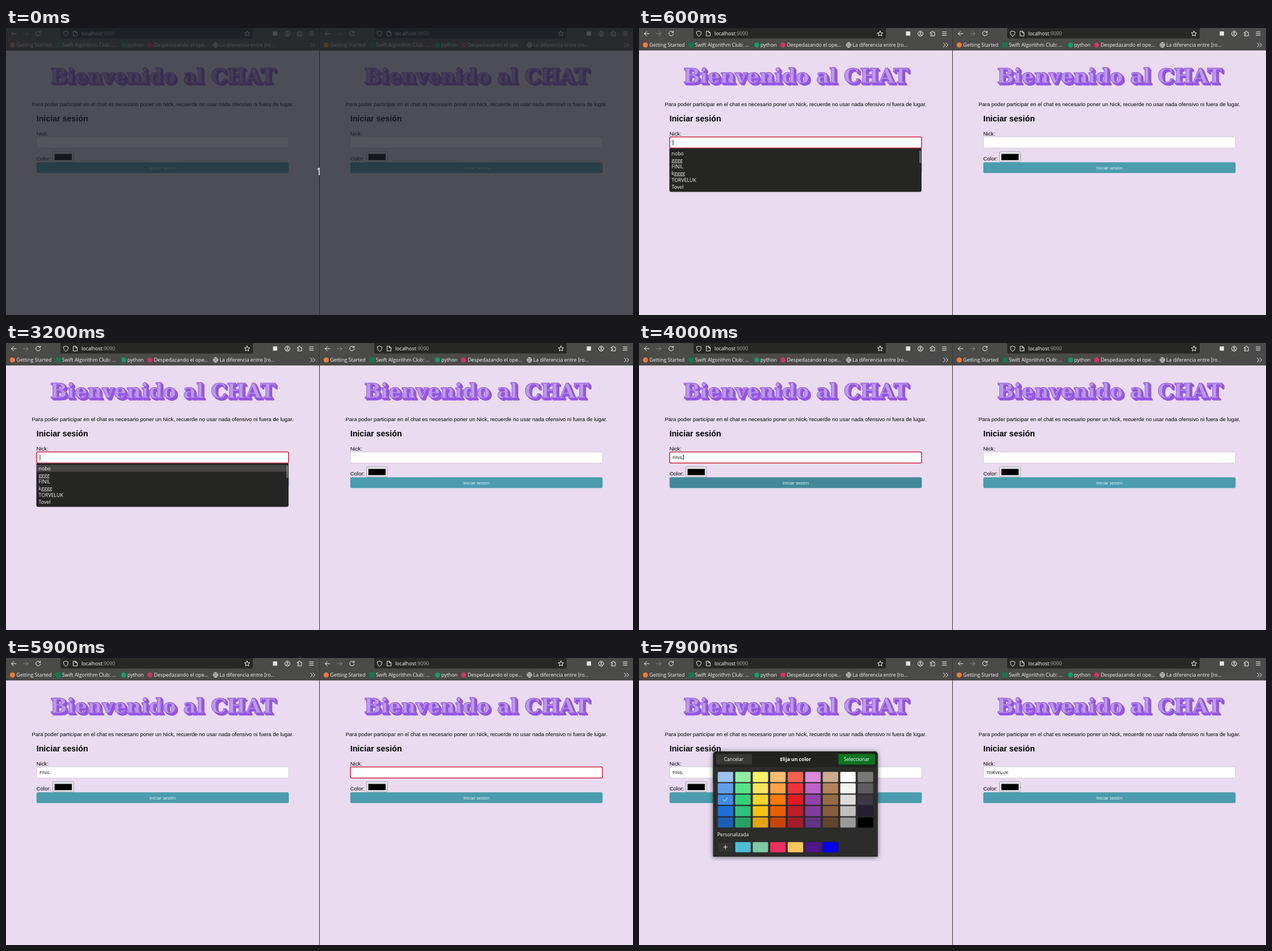
These frames come from a looping animation (1105 px wide and 507 px high, 8 s). An HTML page:

```html
<!DOCTYPE html>
<html lang="es">
<head>
<meta charset="utf-8">
<title>Chat</title>
<style>
  html, body { margin: 0; width: 100%; height: 100%; overflow: hidden; background: #eadbf0; }
  svg { display: block; width: 1105px; height: 507px; }
  text { font: 8.8px "Open Sans", "Noto Sans", sans-serif; white-space: pre; }
  .page { font: 9.48px "Liberation Sans", Arial, sans-serif; }
  .head { font: bold 14.22px "Liberation Sans", Arial, sans-serif; }
  .field { font-size: 7.9px; }
  .button { font-size: 7.6px; fill: #fff; }
  .dialog text { font-size: 8.5px; fill: #fff; }
  .dialog .strong { font-weight: bold; }
  .dialog { filter: drop-shadow(0 1px 4px rgba(0, 0, 0, .55)); }
  .title { font: bold 35.4px "DejaVu Serif", serif; }
  .mid { text-anchor: middle; }
  .icon { fill: none; stroke: #f2f2f0; stroke-width: 1; stroke-linecap: round; stroke-linejoin: round; }
</style>
</head>
<body>
<svg id="stage" viewBox="0 0 1105 507"></svg>
<script>
const LOOP = 8000, SHIFT = 553, ROW = 11.88;
const nicks = ["nobo", "gggg", "FINIL", "kgggg", "TORVELUK", "Tovel"];
const palette = [
  "99c1f1 62a0ea 3584e4 1c71d8 1a5fb4", "8ff0a4 57e389 33d17a 2ec27e 26a269",
  "f9f06b f8e45c f6d32d f5c211 e5a50a", "ffbe6f ffa348 ff7800 e66100 c64600",
  "f66151 ed333b e01b24 c01c28 a51d2d", "dc8add c061cb 9141ac 813d9c 613583",
  "cdab8f b5835a 986a44 865e3c 63452c", "ffffff f6f5f4 dedddb c0bfbc 9a9996",
  "777777 5e5e60 3d3846 241f31 000000"
].map(c => c.split(" "));
const custom = ["4bbfd8", "7bc8a4", "ee2e60", "ffc65d", "4f1787", "0000f0"];

const rect = (x, y, w, h, fill, r = 0, more = "") =>
  `<rect x="${x}" y="${y}" width="${w}" height="${h}" rx="${r}" fill="${fill}" ${more}/>`;
const text = (x, y, s, cls = "", fill = "#000") =>
  `<text x="${x}" y="${y}" class="${cls}" fill="${fill}">${s}</text>`;
const icon = (d, more = "") => `<path class="icon" d="${d}" ${more}/>`;
const dot = (x, fill) => `<circle cx="${x}" cy="30" r="4.5" fill="${fill}"/>`;
const group = (id, body, more = "") => `<g id="${id}" ${more}>${body}</g>`;

function browserBar() {
  const label = (x, s) => text(x, 33.2, s, "", "#f4f4f2");
  return rect(0, 0, 552, 39, "#4a4a48") + rect(0, 38.5, 552, 1, "#2e2e2d")
    + rect(96, -4, 339, 22.6, "#272725", 2.5)
    + icon("M18 10H9.5M13.5 6L9.5 10L13.5 14")
    + icon("M30.5 10H39M35 6L39 10L35 14", 'opacity=".35"')
    + icon("M60 7.2A4.1 4.1 0 1 0 60.8 10.5M60.7 5.5V8H58")
    + icon("M105.5 5.5L109.5 7C109.6 11 108.3 13.2 105.5 14.8C102.7 13.2 101.4 11 101.5 7Z")
    + icon("M119 5.7H123L125.5 8.2V14H119ZM122.8 5.9V8.4H125.3")
    + icon("M425 5.2L426.4 8.3L429.7 8.6L427.2 10.8L428 14.1L425 12.4L422 14.1L422.8 10.8L420.3 8.6L423.6 8.3Z")
    + rect(470.5, 6, 7.5, 7.5, "#e4e4e2")
    + icon("M500.5 10A4.5 4.5 0 1 1 491.5 10A4.5 4.5 0 1 1 500.5 10M497.4 8.6A1.4 1.4 0 1 1 494.6 8.6A1.4 1.4 0 1 1 497.4 8.6M493.4 12.6Q496 10.4 498.6 12.6")
    + icon("M514 7.5H516V6.7A1.3 1.3 0 0 1 518.6 6.7V7.5H521V14H514V11.8H515.2A1.2 1.2 0 0 0 515.2 9.4H514Z")
    + icon("M534.7 6.8H541.7M534.7 9.8H541.7M534.7 12.8H541.7")
    + icon("M536.5 26.5L540 30L536.5 33.5M541 26.5L544.5 30L541 33.5")
    + `<text x="133" y="13.2" fill="#fff">localhost<tspan fill="#a5a5a3">:9090</tspan></text>`
    + dot(11.3, "#f47a32") + label(18.3, "Getting Started")
    + rect(87.5, 25.5, 9, 9, "#147a49") + label(98.7, "Swift Algorithm Club: …")
    + dot(207.5, "#119b6c") + label(214, "python")
    + dot(253.5, "#cf3468") + label(260.7, "Despedazando el ope…")
    + icon("M373.7 30A4.2 4.2 0 1 1 365.3 30A4.2 4.2 0 1 1 373.7 30M365.5 30H373.5M369.5 25.8Q366 30 369.5 34.2Q373 30 369.5 25.8")
    + label(376.2, "La diferencia entre [ro…");
}

function title() {
  const layer = (d, fill) => `<text x="${276 + d}" y="${96.5 + d}" class="title mid" fill="${fill}" stroke="#9655e6" stroke-width=".9">Bienvenido al CHAT</text>`;
  let s = "";
  for (let i = 7; i > 0; i--) s += layer(i * .6, "#9655e6");
  return s + layer(0, "#bb9ce2");
}

const dropdown = id => group("list" + id,
  `<path d="M53.5 212.5H498V286a3.5 3.5 0 0 1-3.5 3.5H57a3.5 3.5 0 0 1-3.5-3.5Z" fill="#252524"/>`
  + rect(54, 215.5, 443.5, ROW, "#464645", 0, `id="row${id}"`)
  + nicks.map((n, i) => text(57.5, 224.7 + i * ROW, n, "", "#f5f5f3")).join("")
  + rect(494.5, 216.5, 2, 22, "#8d8d8b", 1, `id="bar${id}"`));

function pane(id) {
  return group("pane" + id,
    rect(0, 39, 552, 468, "#eadbf0") + browserBar() + title()
    + text(276, 138, "Para poder participar en el chat es necesario poner un Nick, recuerde no usar nada ofensivo ni fuera de lugar.", "page mid")
    + text(53.7, 165.3, "Iniciar sesión", "head")
    + text(53.7, 189.7, "Nick:", "page")
    + rect(54.1, 192.5, 444, 19.5, "#fff", 2, `id="input${id}"`)
    + text(59, 205, "", "field", "#000").replace("<text", `<text id="value${id}"`)
    + rect(59.5, 197.5, .9, 9.5, "#000", 0, `id="caret${id}"`)
    + text(53.7, 233.8, "Color:", "page")
    + rect(82.3, 218.6, 37, 18, "#e9e9ed", 2, `id="pick${id}" stroke="#8f8f9d" stroke-width=".8"`)
    + rect(85.5, 222.2, 30.6, 11.4, "#000", 0, 'stroke="#99999f" stroke-width=".6"')
    + rect(53.8, 237.2, 444.6, 19, "#4b9cae", 2.4, `id="send${id}"`)
    + text(276, 249.5, "Iniciar sesión", "button mid", "#fff")
    + dropdown(id), `transform="translate(${id * SHIFT})"`);
}

function colorDialog() {
  const W = 27.6, H = 18.4, PX = 30.85, PY = 20.1, X = 138.5, Y = 201;
  const cell = (c, x, y) => rect(x, y, W, H, "#" + c, 1.8, 'stroke="#222" stroke-width=".4"');
  const tick = (id, x, y) => icon(`M${x - 3.6} ${y + .2}L${x - 1.2} ${y + 2.7}L${x + 3.8} ${y - 2.6}`, `id="${id}"`);
  return group("dialog",
    rect(130.5, 165, 290.3, 60, "#222221", 5) + rect(130.5, 193, 290.3, 158, "#2c2c2b")
    + rect(135.3, 169.5, 64.3, 18.7, "#373736", 2.5, 'stroke="#1a1a19" stroke-width=".5"')
    + rect(351.2, 169.5, 65, 18.7, "#0c7420", 2.5, 'stroke="#084d15" stroke-width=".5"')
    + text(167, 182, "Cancelar", "mid") + text(275.8, 182, "Elija un color", "mid strong")
    + text(383.7, 182, "Seleccionar", "mid")
    + palette.map((col, i) => col.map((c, j) => cell(c, X + i * PX, Y + j * PY)).join("")).join("")
    + rect(X, Y + 2 * PY, W, H, "#fff", 1.8, 'id="glow" fill-opacity=".06"')
    + tick("tickBlue", 152.2, 250) + tick("tickBlack", 399, 290)
    + text(138, 315.3, "Personalizada")
    + rect(X, 325, W, 18.4, "#343433", 1.8, 'stroke="#1b1b1a" stroke-width=".6"')
    + icon("M149 334H155.4M152.2 330.8V337.2", 'stroke-width=".8"')
    + custom.map((c, i) => cell(c, X + (i + 1) * PX, 325)).join(""), 'class="dialog"');
}

document.getElementById("stage").innerHTML =
  rect(0, 0, 1105, 507, "#eadbf0") + pane(0) + pane(1) + rect(552, 0, 1, 507, "#383838")
  + group("tip", rect(361.8, 216.8, 94.4, 27, "#080808", 2.5, 'stroke="#3a3a39" stroke-width=".7"')
    + text(409, 233.7, "Rellene este campo.", "mid", "#fff"))
  + colorDialog()
  + group("dim", rect(0, 0, 1105, 507, "#1c2227", 0, 'fill-opacity=".76"')
    + `<text x="551.5" y="260" class="mid" fill="#fff" style="font-size:18.5px">1</text>`);

const el = id => document.getElementById(id);
const show = (id, v) => el(id).setAttribute("opacity", +v);
const fill = (id, c) => el(id).setAttribute("fill", c);

function setPane(id, s) {
  const input = el("input" + id), value = el("value" + id);
  input.setAttribute("stroke", s.focus ? "#c9243f" : "#c9c9cc");
  input.setAttribute("stroke-width", s.focus ? 1.5 : .8);
  value.textContent = s.value;
  show("caret" + id, s.caret);
  el("caret" + id).setAttribute("x", s.value ? 59.4 + value.getComputedTextLength() : 59.5);
  show("list" + id, s.list);
  show("bar" + id, s.bar);
  show("row" + id, s.row >= 0);
  el("row" + id).setAttribute("y", 215.5 + Math.max(0, s.row) * ROW);
  const mix = (a, b) => Math.round(a + (b - a) * s.hover);
  fill("send" + id, `rgb(${mix(75, 64)},${mix(156, 130)},${mix(174, 146)})`);
}

function draw(ms) {
  const t = Math.floor(ms / 100) * 100;
  const within = (a, b) => t >= a && t < b;
  const ramp = (a, b) => Math.min(1, Math.max(0, (t - a + 100) / (b - a + 100)));

  setPane(0, {
    focus: within(600, 4700),
    value: t >= 4000 ? nicks[2] : "",
    caret: within(600, 1700) || within(2900, 3900) || within(4000, 4700),
    list: t < 600 ? 0 : 1 - ramp(3900, 4000),
    bar: t < 2900 ? 1 - ramp(1700, 2000) : ramp(2900, 3000),
    row: t < 2900 ? -1 : t < 3500 ? 0 : t < 3700 ? 1 : 2,
    hover: t < 4700 ? 1 - (1 - ramp(3900, 4200)) ** 2 : within(6300, 6600)
  });
  setPane(1, {
    focus: within(4700, 6900),
    value: t >= 6000 ? nicks[4] : "",
    caret: within(4700, 5800) || within(6000, 6900),
    list: ramp(4700, 4800) - ramp(5800, 5900),
    bar: 1,
    row: t < 5200 ? -1 : t < 5300 ? 0 : t < 5600 ? 3 : 4,
    hover: 0
  });
  show("tip", t < 1200 ? 0 : 1 - ramp(2900, 3200));
  fill("pick0", within(6600, 7300) ? "#d0d0d7" : "#e9e9ed");
  show("dialog", ramp(6900, 7000));
  show("glow", t >= 7600);
  show("tickBlue", ramp(7800, 7900));
  show("tickBlack", 1 - ramp(7800, 7900));
  show("dim", t < 100);
}

const start = performance.now();
function tick() {
  draw((performance.now() - start) % LOOP);
  requestAnimationFrame(tick);
}
tick();
</script>
</body>
</html>
```
